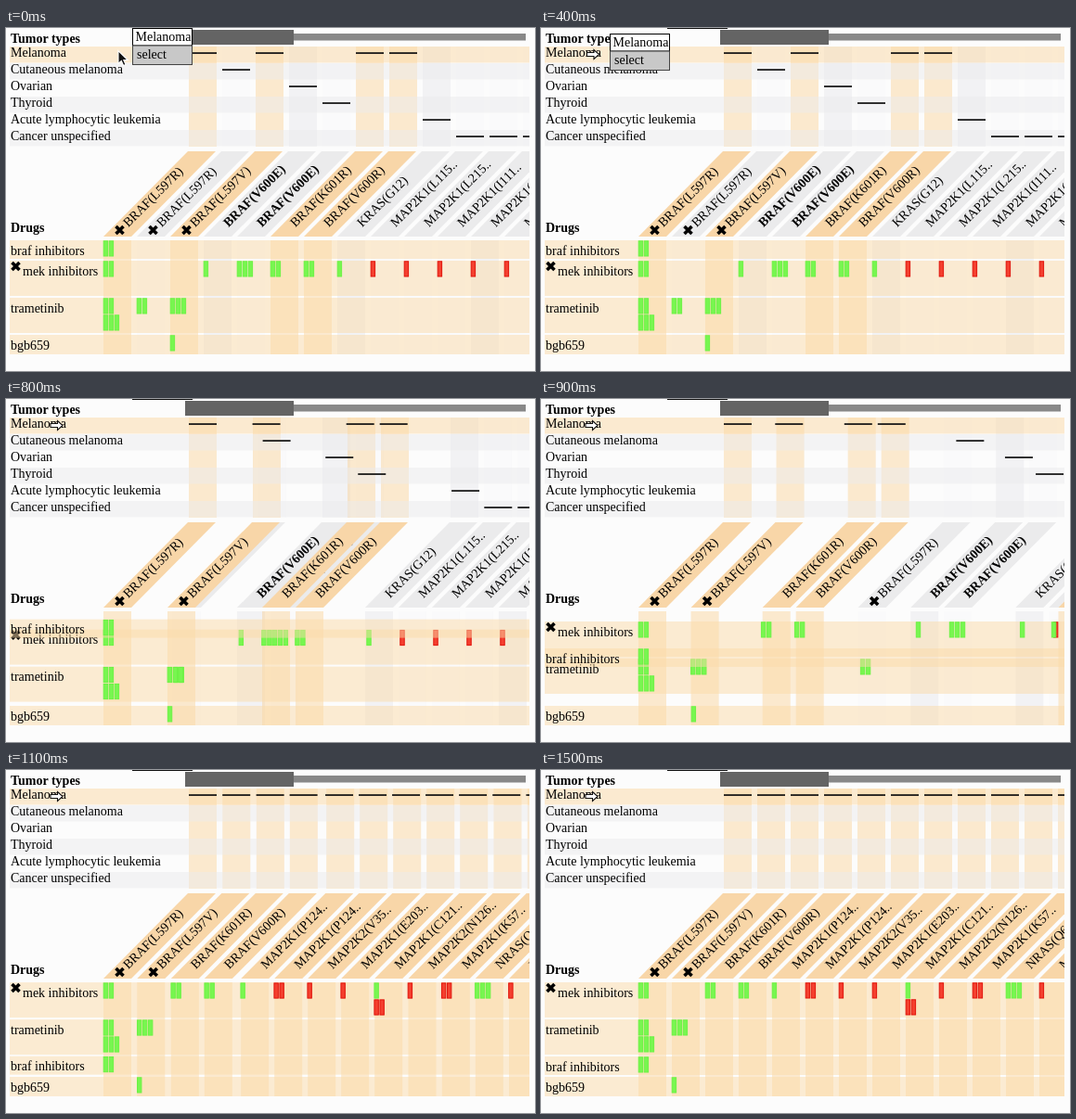
Write an HTML page that moves like this. It is 570 by 370 pixels and loops after 1.6 s.

```html
<!DOCTYPE html>
<html lang="en">
<head>
<meta charset="utf-8">
<title>Tumor types and drugs</title>
<style>
html, body { margin: 0; width: 100%; height: 100%; overflow: hidden; background: #fcfcfc; }
svg { display: block; width: 570px; height: 370px; font: 14px "Liberation Serif", "Times New Roman", serif; }
text { white-space: pre; }
</style>
</head>
<body>
<svg id="stage" viewBox="0 0 570 370"></svg>
<script>
const stage = document.getElementById('stage');
const LOOP = 1600, STEP = 100, PITCH = 36, LEFT = 105, SHIFT = 92, SELECTED = 14;

const tumors = ['Melanoma', 'Cutaneous melanoma', 'Ovarian', 'Thyroid',
  'Acute lymphocytic leukemia', 'Cancer unspecified'];

// [slot, selected, label, tumor row, cells per drug, style]; "/" starts a second line of cells
const columns = [
  [0, 1, 'BRAF(L597R)', 0, { mek: 'gg', tram: 'gg/ggg', braf: 'gg' }, 'cross'],
  [1, 0, 'BRAF(L597R)', 1, { tram: 'gg' }, 'cross'],
  [2, 1, 'BRAF(L597V)', 0, { tram: 'ggg', bgb: 'g' }, 'cross'],
  [3, 0, 'BRAF(V600E)', 2, { mek: 'g' }, 'bold'],
  [4, 0, 'BRAF(V600E)', 3, { mek: 'ggg' }, 'bold'],
  [5, 1, 'BRAF(K601R)', 0, { mek: 'gg' }],
  [6, 1, 'BRAF(V600R)', 0, { mek: 'gg' }],
  [7, 0, 'KRAS(G12)', 4, { mek: 'g' }],
  [8, 0, 'MAP2K1(L115..', 5, { mek: 'r' }],
  [9, 0, 'MAP2K1(L215..', 5, { mek: 'r' }],
  [10, 0, 'MAP2K1(I111..', 5, { mek: 'r' }],
  [11, 0, 'MAP2K1(', 5, { mek: 'r' }],
  [12, 0, 'MAP2K1(', 5, { mek: 'r' }],
  [19, 1, 'MAP2K1(P124..', 0, { mek: 'g' }],
  [20, 1, 'MAP2K1(P124..', 0, { mek: 'rr' }],
  [21, 1, 'MAP2K2(V35..', 0, { mek: 'r' }],
  [22, 1, 'MAP2K1(E203..', 0, { mek: 'r' }],
  [23, 1, 'MAP2K1(C121..', 0, { mek: 'g/rr' }],
  [25, 1, 'MAP2K2(N126..', 0, { mek: 'r' }],
  [27, 1, 'MAP2K1(K57..', 0, { mek: 'rr' }],
  [28, 1, 'NRAS(Q61..', 0, { mek: 'ggg' }],
  [30, 1, 'MAP2K1(', 0, { mek: 'r' }]
].map(([from, sel, label, tumor, cells, style]) => ({ from, sel, label, tumor, cells, style }));

// Selected columns gather on the left, the others follow in order.
let rank = 0;
for (const c of columns) c.to = c.sel ? rank++ : c.from + SELECTED - rank;
columns.sort((a, b) => a.sel - b.sel || a.from - b.from);

const drugs = [
  { key: 'mek', label: 'mek inhibitors', from: 251, to: 229, h: 38 },
  { key: 'tram', label: 'trametinib', from: 291, to: 269, h: 38 },
  { key: 'braf', label: 'braf inhibitors', from: 229, to: 309, h: 20 },
  { key: 'bgb', label: 'bgb659', from: 331, to: 331, h: 21 }
];

const paints = { g: ['#78f650', '#6cf244'], r: ['#f4402f', '#e0120a'] };

const mix = (a, b, p) => a + (b - a) * p;
const rect = (x, y, w, h, fill, more = '') =>
  `<rect x="${x}" y="${y}" width="${w}" height="${h}" fill="${fill}" ${more}/>`;
const text = (x, y, s, more = '') => `<text x="${x}" y="${y}" ${more}>${s}</text>`;
const cross = (x, y) =>
  `<path d="M${x - 4} ${y - 4}l8 8m0-8l-8 8" stroke="#000" stroke-width="3.6"/>`;

function progress(ms, start) {
  if (ms < 700) return 0;
  const t = Math.min(1, Math.max(0.1, (ms - start) / 500));
  return t < 0.5 ? 4 * t ** 3 : 1 - 4 * (1 - t) ** 3;
}

function columnX(c, p) {
  return LEFT + PITCH * mix(c.from, c.to, p);
}

function bandFill(c) {
  if (c.sel) return 'rgba(248,205,140,.42)';
  return c.from % 4 === 3 ? 'rgba(234,234,238,.5)' : 'rgba(246,246,247,.4)';
}

function bands(p) {
  let s = '';
  for (const c of columns) {
    const x = columnX(c, p), fill = bandFill(c);
    s += rect(x + SHIFT, 20, 30, 108, fill) + rect(x, 229, 30, 123, fill);
  }
  return s;
}

function tumorRows(ms) {
  let s = '';
  tumors.forEach((_, i) => {
    const fill = i === 0 ? 'rgba(252,218,165,.5)' : i % 2 ? 'rgba(235,235,238,.5)' : '';
    if (fill) s += rect(4, 20 + 18 * i, 560, 17.5, fill);
  });
  for (const c of columns) {
    const x = columnX(c, progress(ms, 656 + 1.2 * c.tumor));
    s += rect(x + SHIFT, 26.2 + 18 * c.tumor, 30, 1.7, '#111');
  }
  return s;
}

function headers(p) {
  let s = '';
  for (const c of columns) {
    const x = columnX(c, p);
    s += `<path d="M${x} 225h30l91-92h-30z" fill="${c.sel ? '#f8d6a8' : '#ebebec'}"/>`;
    s += text(0, 0, c.label, `transform="translate(${x + 26.7} 215.3) rotate(-45)"` +
      (c.style === 'bold' ? ' font-weight="bold"' : ''));
    if (c.style === 'cross') s += cross(x + 17.5, 218);
  }
  return s;
}

function cellBlock(x, y, code) {
  let s = '';
  code.split('/').forEach((line, j) => [...line].forEach((k, i) => {
    const [fill, edge] = paints[k];
    s += rect(x + 6 * i + 0.2, y + 18 * j + 0.3, 4.4, 16.2, fill, `stroke="${edge}"`);
  }));
  return s;
}

function drugRows(ms) {
  let s = '';
  drugs.forEach((d, i) => {
    const y = mix(d.from, d.to, progress(ms, 650));
    const p = progress(ms, 660 + 1.5 * i);
    s += rect(4, y, 560, d.h, 'rgba(252,220,170,.5)');
    for (const c of columns) {
      if (c.cells[d.key]) s += cellBlock(columnX(c, p), y + 0.5, c.cells[d.key]);
    }
    const marked = d.key === 'mek';
    if (marked) s += cross(10.5, y + 6);
    s += text(marked ? 18 : 5, y + 15.5, d.label);
  });
  return s;
}

function popup(x, y) {
  return rect(x + 0.5, y + 0.5, 64, 18.5, '#fff', 'stroke="#000"') +
    rect(x + 0.5, y + 19, 64, 20.5, '#c8c8c8', 'stroke="#444"') +
    text(x + 3.5, y + 14, 'Melanoma') + text(x + 5, y + 33, 'select');
}

function pointer(x, y, arrow) {
  const d = arrow
    ? 'M0 0v14l3.3-3 2.3 5 2.4-1-2.2-5h4.4z'
    : 'M0 3h7.5V0L13 5 7.5 10V7H0z';
  const paint = arrow ? 'fill="#111" stroke="#fff"' : 'fill="#fff" stroke="#111"';
  return `<path d="${d}" ${paint} stroke-width="1.1" transform="translate(${x} ${y})"/>`;
}

function draw(ms) {
  const hover = ms < 200 ? 0 : Math.min(1, 0.35 + 0.4 * (ms - 200) / 100);
  const slide = progress(ms, 662.5);
  let s = '<clipPath id="view"><rect x="4" width="560" height="370"/></clipPath>';
  s += rect(0, 0, 570, 370, '#fcfcfc');
  s += rect(193, 2, 117, 16, '#646464') + rect(310, 6, 250, 7.5, '#888');
  s += '<g clip-path="url(#view)">' + bands(slide) + tumorRows(ms) +
    headers(slide) + drugRows(ms) + '</g>';
  s += text(5, 16, 'Tumor types', 'font-weight="bold"') +
    text(5, 219.5, 'Drugs', 'font-weight="bold"');
  tumors.forEach((name, i) => { s += text(5, 31.2 + 18 * i, name); });
  s += rect(136, 0, 65, 1, '#111');
  if (ms < 700) s += popup(mix(136, 74, hover), mix(0, 6, hover));
  if (ms < 200) s += pointer(121, 24.5, true);
  else s += pointer(ms < 700 ? mix(110, 49.5, hover) : 48, 23.5, false);
  stage.innerHTML = s;
}

let shown = -1;
function tick(now) {
  const ms = Math.floor((now % LOOP) / STEP) * STEP;
  if (ms !== shown) draw(shown = ms);
  requestAnimationFrame(tick);
}
draw(0);
requestAnimationFrame(tick);
</script>
</body>
</html>
```
